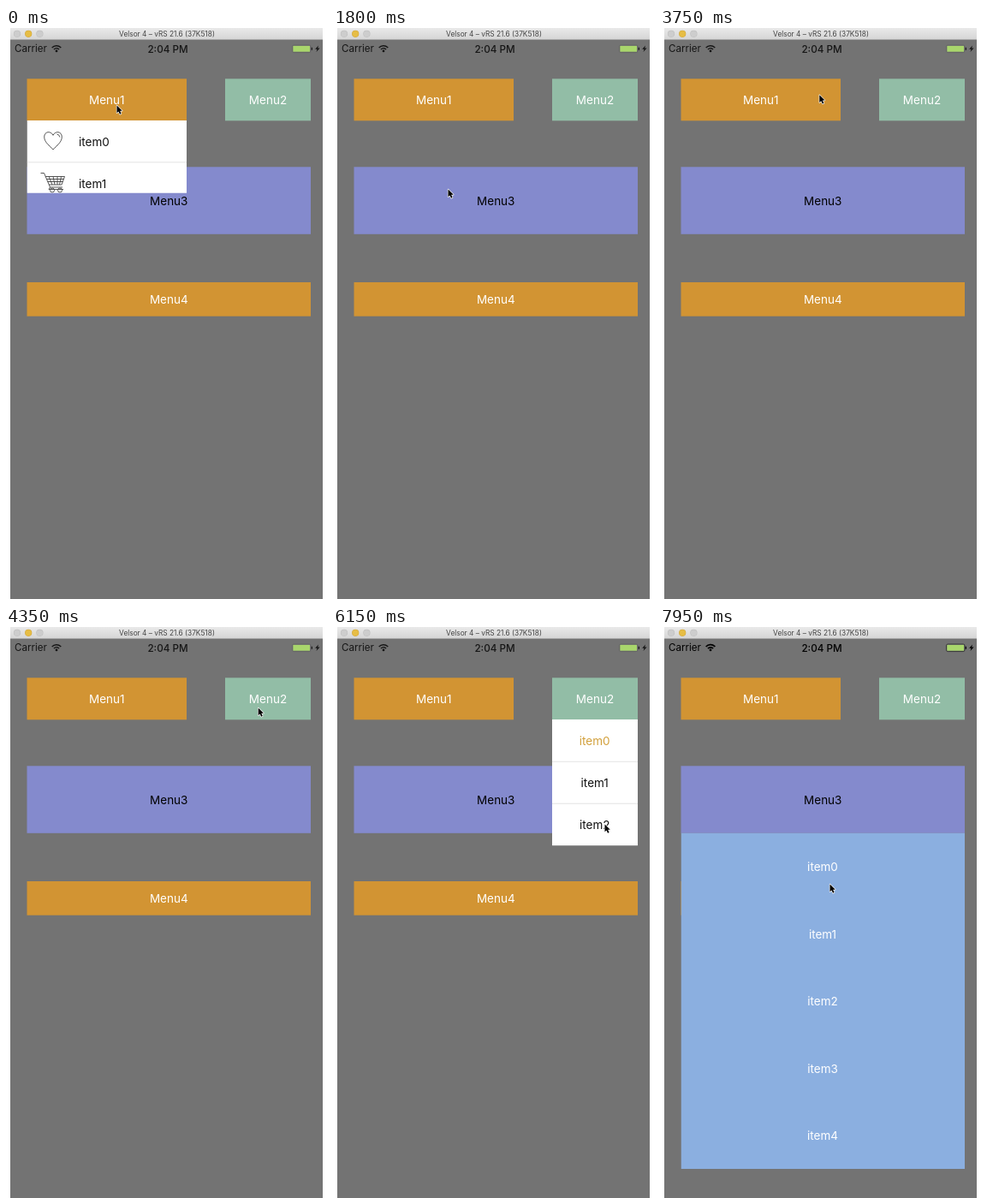
Animation, 375 px wide and 667 px high, one loop 8 s. Source, as an HTML page with a canvas:

```html
<!DOCTYPE html>
<html lang="en">
<head>
<meta charset="utf-8">
<title>Dropdown menus</title>
<style>
html, body { margin: 0; width: 100%; height: 100%; overflow: hidden; background: #fff; }
canvas { display: block; width: 375px; height: 667px; }
</style>
</head>
<body>
<canvas id="stage"></canvas>
<script>
const W = 375, H = 667, LOOP = 8000, STEP = 150;
const ORANGE = '#d29433', GREEN = '#92bda6', PURPLE = '#848acd', BLUE = '#8bafe0', GOLD = '#d2a03c';
const FONT = 'Inter, Roboto, "Liberation Sans", sans-serif';
const canvas = document.getElementById('stage');
const ctx = canvas.getContext('2d');
const dpr = window.devicePixelRatio || 1;
canvas.width = W * dpr;
canvas.height = H * dpr;

const clamp = v => Math.max(0, Math.min(1, v));
const ease = v => { v = clamp(v); return v * v * (3 - 2 * v); };
const ramp = (t, from, to) => ease((t - from) / (to - from));

// Each span: opening start, closing start
const unfold = (t, spans, dur = 300) =>
  spans.reduce((sum, [a, b]) => sum + ramp(t, a, a + dur) - ramp(t, b, b + dur), 0);

const pointer = [
  [0, 129, 90], [200, 129, 90], [450, 131, 165], [1250, 133, 188], [1800, 134, 188],
  [2300, 128, 85], [2700, 127, 72], [3000, 127, 69], [3450, 127, 69], [4200, 294, 94],
  [4750, 295, 94], [5100, 301, 130], [5350, 301, 131], [5600, 303, 95], [5850, 303, 95],
  [6150, 317, 230], [6300, 317, 230], [6600, 301, 99], [7100, 301, 99],
  [7400, 200, 205], [7600, 200, 205], [7950, 198, 300]
];

function pointerAt(t) {
  let i = 0;
  while (i < pointer.length - 2 && pointer[i + 1][0] <= t) i++;
  const [t0, x0, y0] = pointer[i], [t1, x1, y1] = pointer[i + 1];
  const k = ramp(t, t0, t1);
  return [x0 + (x1 - x0) * k, y0 + (y1 - y0) * k];
}

function rect(x, y, w, h, color) {
  ctx.fillStyle = color;
  ctx.fillRect(x, y, w, h);
}

function text(str, x, y, color, size = 13.5, align = 'center', weight = 400) {
  ctx.font = `${weight} ${size}px ${FONT}`;
  ctx.textAlign = align;
  ctx.textBaseline = 'alphabetic';
  ctx.fillStyle = color;
  ctx.fillText(str, x, y + size * 0.36);
}

function button(label, x, y, w, h, color, ink) {
  rect(x, y, w, h, color);
  text(label, x + w / 2, y + h / 2 + 0.5, ink);
}

function dot(x, y, r, color) {
  ctx.fillStyle = color;
  ctx.beginPath();
  ctx.arc(x, y, r, 0, 7);
  ctx.fill();
}

function circle(x, y, r) {
  ctx.moveTo(x + r, y);
  ctx.arc(x, y, r, 0, Math.PI * 2);
}

function outline(d) {
  ctx.stroke(new Path2D(d));
}

// Icons are drawn around their own centre
const icons = [
  () => {
    outline('M0 10.5C-4 6-10.3 2-10.3-4.3C-10.3-11-2.3-11.6 0-6.2C2.3-11.6 10.3-11 10.3-4.3C10.3 2 4 6 0 10.5Z');
    outline('M4.5-7.5Q7.5-7 7.8-4');
  },
  () => {
    outline('M-14.5-11H-10.5L-3.5 5.5H11M-9-7H13.5L10 2.5H-5M-7.5-4H12.5M-6.2-1H11.3M-5-7L-1 2.5M0-7L2 2.5M5-7V2.5M9.5-7L7.5 2.5M-3.5 5.5L-5 8H12');
    ctx.beginPath();
    circle(-1, 9, 2.5);
    circle(8, 9, 2.5);
    ctx.stroke();
  },
  () => {
    ctx.beginPath();
    ctx.roundRect(-8.5, -12.5, 17, 25, 8);
    ctx.roundRect(-1.7, -8.5, 3.4, 7, 1.7);
    ctx.stroke();
    outline('M-8.5-2Q0 3 8.5-2M0-12.5V-8.5');
  },
  () => {
    ctx.beginPath();
    circle(-1, -4, 7.6);
    ctx.stroke();
    outline('M-6-4.5Q-5.5-8.5-2-9M2.5 3L6.5 11.5Q8 13 9 11L4.5 2.2');
  }
];

function drawIcon(i, x, y) {
  ctx.save();
  ctx.translate(x, y);
  ctx.strokeStyle = '#444';
  ctx.lineWidth = 0.9;
  ctx.lineJoin = 'round';
  icons[i]();
  ctx.restore();
}

function dropdown(x, y, w, full, k, color, paint) {
  if (k <= 0.001) return;
  ctx.save();
  ctx.beginPath();
  ctx.rect(x, y, w, full * k);
  ctx.clip();
  rect(x, y, w, full, color);
  paint();
  ctx.restore();
}

function iconList(t) {
  const k = unfold(t, [[-165, 1350], [2400, 3150]]);
  const scroll = 110 * ramp(t, 400, 1050);
  const labels = ['item0', 'item1', 'item2', 'item3', 'item3', 'item4', 'item5'];
  dropdown(24.5, 108, 186.5, 147.5, k, '#fff', () => {
    labels.forEach((label, i) => {
      const top = 108 + i * 49 - scroll, mid = top + 24.5;
      if (icons[i]) {
        drawIcon(i, 55, mid - 1);
        text(label, 85, mid + 0.5, '#111', 13.5, 'left');
      } else {
        text(label, 117.5, mid + 0.5, '#111');
      }
      rect(24.5, top + 48.5, 186.5, 0.8, '#dcdcdc');
    });
    const fade = ramp(t, 350, 450) - ramp(t, 1250, 1500) + ramp(t, 2400, 2500) - ramp(t, 3150, 3400);
    ctx.globalAlpha = clamp(fade);
    ctx.fillStyle = '#b0b0b0';
    ctx.beginPath();
    ctx.roundRect(205, 109 + scroll * 147 / 343, 2.8, 60, 1.4);
    ctx.fill();
  });
}

function plainList(t) {
  const k = unfold(t, [[4400, 5250], [5650, 6250], [6550, 7050]]);
  const chosen = t < 5250 ? -1 : t < 6250 ? 0 : 2;
  dropdown(256, 108, 100, 147.5, k, '#fff', () => {
    for (let i = 0; i < 3; i++) {
      text('item' + i, 305.7, 133 + i * 49, i === chosen ? GOLD : '#111');
      if (i < 2) rect(256, 156.8 + i * 49, 100, 0.8, '#dcdcdc');
    }
  });
}

function blueList(t) {
  const k = ramp(t, 7480, 7800);
  dropdown(24.5, 240.5, 331.5, 392.5, k, BLUE, () => {
    for (let i = 0; i < 5; i++) text('item' + i, 190, 280.3 + i * 78.5, '#fff');
  });
}

function titleBar() {
  const g = ctx.createLinearGradient(0, 0, 0, 13);
  g.addColorStop(0, '#e9e9e9');
  g.addColorStop(1, '#d6d6d6');
  rect(5, 0, 365, 13.5, g);
  rect(5, 13, 365, 0.6, '#a9a9a9');
  ['#cdcdcd', '#e6bd45', '#cdcdcd'].forEach((c, i) => {
    dot(13 + i * 13.2, 6.8, 4.1, i === 1 ? '#d0a63a' : '#bcbcbc');
    dot(13 + i * 13.2, 6.8, 3.6, c);
  });
  text('Velsor 4 – vRS 21.6 (37K518)', 188, 7, '#444', 8.3);
}

function statusBar(sharp) {
  const ink = sharp ? '#000' : '#161616';
  text('Carrier', 10, 24.3, ink, 11.6, 'left');
  text('2:04 PM', 189, 24.3, ink, 11.7, 'center', 500);
  ctx.strokeStyle = ink;
  ctx.lineWidth = sharp ? 1.7 : 1.4;
  for (const r of [4.2, 7.3]) {
    ctx.beginPath();
    ctx.arc(59, 28, r, -Math.PI * 0.76, -Math.PI * 0.24);
    ctx.stroke();
  }
  dot(59, 26.9, 1.4, ink);
  ctx.lineWidth = 0.7;
  ctx.strokeStyle = sharp ? '#222' : '#606060';
  ctx.beginPath();
  ctx.roundRect(334.5, 20, 21.5, 8.6, 1.8);
  ctx.stroke();
  rect(335.4, 20.9, 19.6, 6.8, '#a9d66c');
  rect(356.7, 22.8, 1.2, 3, ink);
  ctx.fillStyle = ink;
  ctx.fill(new Path2D('M365 20.5L361.2 24.8H363.5L362.5 28L366.6 23.6H364.2Z'));
}

function drawPointer(x, y) {
  ctx.save();
  ctx.translate(x, y);
  const arrow = new Path2D('M0.5 0.5V9.2L2.5 7.4L4 10.8L5.6 10.1L4.1 6.8H6.8Z');
  ctx.strokeStyle = '#fff';
  ctx.lineWidth = 1.3;
  ctx.lineJoin = 'round';
  ctx.stroke(arrow);
  ctx.fillStyle = '#000';
  ctx.fill(arrow);
  ctx.restore();
}

function draw(t) {
  ctx.setTransform(dpr, 0, 0, dpr, 0, 0);
  rect(0, 0, W, H, '#fff');
  rect(5, 13, 365, H - 13, '#737373');
  titleBar();
  statusBar(t >= 7500);
  button('Menu1', 24.5, 59.3, 186.5, 49, ORANGE, '#fff');
  button('Menu2', 256, 59.3, 100, 49, GREEN, '#fff');
  button('Menu3', 24.5, 162.3, 331.5, 78.5, PURPLE, '#000');
  button('Menu4', 24.5, 297, 331.5, 39.7, ORANGE, '#fff');
  iconList(t);
  plainList(t);
  blueList(t);
  drawPointer(...pointerAt(t));
}

const start = performance.now();
function tick() {
  const t = (performance.now() - start) % LOOP;
  draw(Math.floor(t / STEP) * STEP);
  requestAnimationFrame(tick);
}
tick();
</script>
</body>
</html>
```
